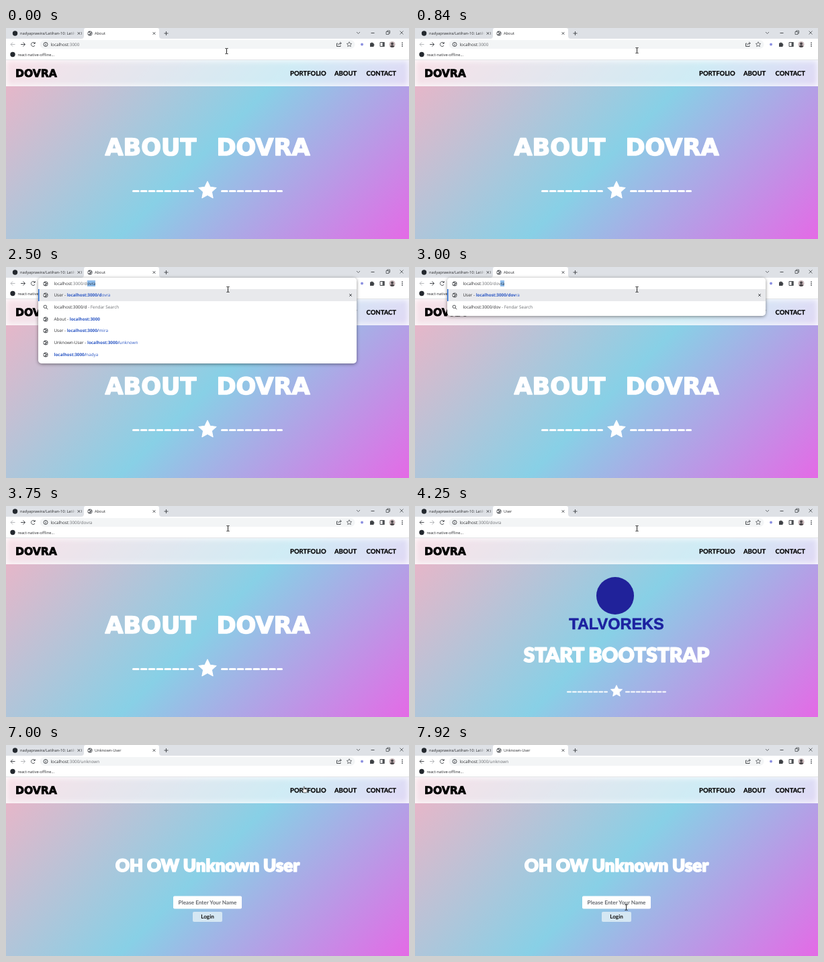
Write an HTML page that moves like this. It is 600 px wide and 315 px high and loops after 8000 ms.

```html
<!DOCTYPE html>
<html lang="en">
<head>
<meta charset="utf-8">
<style>
html, body { margin: 0; width: 600px; height: 315px; overflow: hidden; }
body {
  position: relative; text-rendering: geometricPrecision;
  background: linear-gradient(135deg, #efb4c6, #88d0e6 50%, #e46ae6) 0 48px / 600px 267px no-repeat #fff;
}
body > * { position: absolute; left: 0; top: 0; }
#nav {
  top: 48px; width: 600px; height: 39px;
  background: #fff9; box-shadow: inset 0 0 8px 1px #fffd;
}
text, #drop { font-family: "Open Sans", sans-serif; font-size: 6.35px; fill: #2c2d30; }
.tab { font-size: 5.7px; }
.gray { fill: #6a6d71; color: #6a6d71; }
.wide { font: bold 35px "DejaVu Sans", sans-serif; }
.lato { font-family: Lato, sans-serif; font-weight: 700; fill: #111; }
.link { font-size: 9.5px; fill: #000; stroke: #000; stroke-width: .25; }
.title { fill: #fff; stroke: #fff; stroke-width: 1.6; stroke-linejoin: round; font-weight: 900; text-anchor: middle; }
.mid { text-anchor: middle; }
.line { fill: none; stroke: #4b4e52; stroke-width: 1; }
#drop {
  left: 48px; top: 16px; width: 474px; padding-bottom: 4px; overflow: hidden;
  background: #fff; border-radius: 5px; color: #2c2d30; white-space: pre;
}
#shade { left: 48px; top: 16px; width: 474px; border-radius: 5px; box-shadow: 0 1px 5px #0007; }
#drop div { position: relative; height: 17.75px; line-height: 17.75px; padding-left: 23.5px; }
#drop div.input { height: 17px; line-height: 17px; }
#drop div.hit { background: #e8e9ec; box-shadow: inset 1.5px 0 #2a6fd6; }
#drop svg { position: absolute; left: 7px; top: 5px; }
#drop svg.clear { left: 461px; }
#drop a, #drop b { color: #2b57c4; }
#drop mark { background: #8fbdec; color: #24364a; }
</style>
</head>
<body>
<div id="nav"></div>
<svg width="600" height="315">
  <defs>
    <g id="globe">
      <circle cx="4" cy="4" r="3.5" fill="#505357"/>
      <path d="M1 3.2L3 2.6L4.2 3.8L3.2 5L3.4 6.5L1.6 5ZM4.4 1.2L6.3 2.2L5.2 3.4L4.2 2.5ZM5 4.6L6.8 4.2L6 5.9L5 6.2Z" fill="#fff"/>
    </g>
    <path id="cross" class="line" d="M-1.8 -1.8L1.8 1.8M1.8 -1.8L-1.8 1.8"/>
    <path id="star" d="M0 -1L.3 -.38L.97 -.3L.47 .16L.6 .83L0 .5L-.6 .83L-.47 .16L-.97 -.3L-.3 -.38Z" stroke-linejoin="round"/>
    <path id="back" d="M6.5 0H0M3 -3L0 0L3 3" fill="none"/>
    <linearGradient id="fade"><stop stop-color="#dee1e6" stop-opacity="0"/><stop offset="1" stop-color="#dee1e6"/></linearGradient>
  </defs>
  <rect width="600" height="16" fill="#dee1e6"/>
  <path d="M112 16Q116 16 116 12V3Q116 0 119 0H225Q228 0 228 3V12Q228 16 232 16Z" fill="#fff"/>
  <rect y="16" width="600" height="32" fill="#fff"/>
  <rect y="47" width="600" height="1" fill="#e3e4e7"/>
  <circle cx="13.5" cy="8" r="3.7" fill="#24292f"/>
  <text class="tab" x="21" y="10">nadyaprawira/Latihan-10: Latihan I</text>
  <rect x="95" width="9" height="15" fill="url(#fade)"/>
  <rect x="104" width="8" height="15" fill="#dee1e6"/>
  <use href="#cross" x="108.5" y="8"/>
  <use href="#globe" x="121" y="4"/>
  <use href="#cross" x="220.5" y="8"/>
  <g class="line">
    <path d="M235.5 8H241.5M238.5 5V11M543.5 7.5H548.5"/>
    <path d="M522 6L524.5 8.5L527 6M586.5 4.5L591.5 9.5M591.5 4.5L586.5 9.5M566 5.5H570V9.5H566ZM567.5 5.5V4H571.5V8H570" stroke-width=".8"/>
    <path d="M43 23A3 3 0 1 0 43 26M43.2 21V23.3H41"/>
  </g>
  <g id="arrows"></g>
  <g id="box"></g>
  <circle cx="530" cy="24.5" r="2" fill="#8b8fe0"/>
  <path d="M542 22.5H543.5A1.3 1.3 0 0 1 546 22.5H547.5V24A1.3 1.3 0 0 1 547.5 26.5V28H542Z" fill="#3f4246"/>
  <path class="line" d="M557 21.5H563V27.5H557Z"/><path d="M560.5 21H563.5V28H560.5Z" fill="#4b4e52"/>
  <circle cx="575" cy="24.5" r="4.5" fill="#c9b9bb"/>
  <path d="M571.5 27.4Q575 23.5 578.5 27.4Q575 30.6 571.5 27.4" fill="#4b4649"/><circle cx="575" cy="23.5" r="2" fill="#4b4649"/>
  <path d="M590 21.5V28" stroke="#4b4e52" stroke-width="1.5" stroke-dasharray="1.5 1"/>
  <circle cx="10" cy="39.5" r="3.7" fill="#24292f"/>
  <text class="tab" x="17.5" y="41.5">react-native-offline...</text>
  <text class="wide" x="14" y="73" style="font-size:15.6px;fill:#000;stroke:#000;stroke-width:.8">DOVRA</text>
  <text class="lato link" x="423" y="70.5">PORTFOLIO</text>
  <text class="lato link" x="489" y="70.5">ABOUT</text>
  <text class="lato link" x="536.5" y="70.5">CONTACT</text>
  <g id="page"></g>
</svg>
<div id="shade"></div>
<div id="drop"></div>
<svg width="600" height="315"><g id="cursor"></g></svg>
<script>
const LOOP = 8000, STEP = 1000 / 12, HOST = 'localhost:3000', NAME = 'dovra';
const $ = id => document.getElementById(id);

const divider = (y, from, to, thick, r) => {
  const dash = (to - from + thick) / 8, gap = thick * 1.4;
  const row = x => `<path d="M${x + thick / 2} ${y}h${to - from - thick}" stroke="#fff" stroke-width="${thick}"
    stroke-linecap="round" stroke-dasharray="${dash - gap} ${gap}"/>`;
  return row(from) + row(600 - to) +
    `<use href="#star" transform="translate(300 ${y - 1}) scale(${r})" fill="#fff" stroke="#fff" stroke-width=".08"/>`;
};

const pages = {
  about: {
    title: 'About', path: '',
    body: `<text class="wide title" x="300" y="189.5" style="word-spacing:18px;font-weight:700">ABOUT DOVRA</text>`
      + divider(243.5, 188, 280, 3, 13.5)
  },
  user: {
    title: 'User', path: '/' + NAME,
    body: `<circle cx="298" cy="134" r="28" fill="#20229a"/>
      <text class="mid" x="300" y="184" stroke="#1c22a0" stroke-width=".6"
        style="font:bold 23.5px 'Liberation Sans',sans-serif;fill:#1c22a0">TALVOREKS</text>
      <text class="lato title" x="300" y="233" style="font-size:29.7px;fill:#fff">START BOOTSTRAP</text>`
      + divider(277.5, 226, 287, 2, 9)
  },
  unknown: {
    title: 'Unknown-User', path: '/unknown',
    body: `<text class="lato title" x="300" y="188.5" style="font-size:25.8px;fill:#fff">OH OW Unknown User</text>
      <rect x="249" y="225.5" width="102" height="19" rx="2" fill="#fff"/>
      <text class="lato mid" x="300" y="237.8" style="font-size:8.2px;fill:#666a70">Please Enter Your Name</text>
      <rect x="278" y="249" width="44" height="15" rx="2" fill="#d5e7f3"/>
      <text class="lato mid" x="300" y="259.2" style="font-size:8.2px">Login</text>`
  }
};

const arrows = (back, forward) => `
  <use href="#back" transform="translate(7 24.5)" stroke="${back}"/>
  <use href="#back" transform="translate(28.5 24.5) scale(-1 1)" stroke="${forward}"/>`;

const addressBox = (path, focus) => `
  <rect x="50.5" y="18" width="469" height="13" rx="6.5" fill="${focus ? '#fff' : '#f3f5f6'}"
    stroke="#2a76d8" stroke-width="${focus ? 1.5 : 0}"/>
  <g class="line" stroke-width=".8"><circle cx="59" cy="24.5" r="3"/><path d="M59 24V26.3M59 22.5V23.3"/>
    <path d="M494 23H492.5V27.5H498V26M494.5 25.5Q495 22.5 499 22.8M497.3 21L499.3 22.8L497.3 24.6"/></g>
  <use href="#star" transform="translate(511 24.5) scale(3.8)" fill="none" stroke="#4b4e52" stroke-width=".2"/>
  <text x="66.5" y="26.7">localhost<tspan class="gray">:3000${path}</tspan></text>`;

const icon = (shape, cls = '') => `<svg class="${cls}" width="8" height="8">${shape}</svg>`;
const globe = icon('<use href="#globe"/>');
const lens = icon('<path class="line" d="M5 5L7.2 7.2M5.5 3.3A2.2 2.2 0 1 0 1.1 3.3A2.2 2.2 0 1 0 5.5 3.3"/>');
const clear = icon('<use href="#cross" x="4" y="4"/>', 'clear');

function suggestions(typed) {
  const rest = NAME.slice(typed.length);
  const row = (label, bold, tail = '') => `<div>${globe}${label}<b>${bold}</b><a>${tail}</a></div>`;
  const others = row('About - ', HOST) + row('User - ', HOST + '/', 'mira')
    + row('Unknown-User - ', HOST + '/', 'unknown') + row('', HOST + '/', 'nadya');
  return `<div class="input">${globe}localhost<span class="gray">:3000/${typed}</span>${typed ? `<mark>${rest}</mark>` : ''}</div>
<div class="hit">${globe}User - <b>${HOST}/${typed}</b><a>${rest}</a>${clear}</div>
<div>${lens}${HOST}/${typed}<span class="gray"> - Fendar Search</span></div>${typed.length < 2 ? others : ''}`.replace(/\n/g, '');
}

const pointers = {
  beam: '<path d="M-2 -4H-.5L0 -3.5L.5 -4H2M0 -3.5V3.5M-2 4H-.5L0 3.5L.5 4H2" fill="none" stroke="#222"/>',
  arrow: '<path d="M0 0V8L2 6.3L3.3 9L4.5 8.4L3.3 5.8H5.8Z" fill="#fff" stroke="#222" stroke-width=".6"/>',
  hand: '<path d="M-1.5 -4Q-.7 -5 0 -4V-1L3.5 0Q4 1 3.3 4.5H-1.5L-3.7 1Q-3.5 0 -1.5 1Z" fill="#fff" stroke="#333" stroke-width=".7"/>'
};
const keys = [[0, 328, 34], [170, 330, 33], [4500, 330, 33], [4840, 444, 66], [7170, 444, 66], [7420, 314, 242], [LOOP, 314, 242]];

function cursorAt(t) {
  const i = keys.findIndex(k => k[0] > t), [a, x, y] = keys[i - 1], [b, u, v] = keys[i];
  const p = (t - a) / (b - a), k = p * p * (3 - 2 * p);
  return [x + (u - x) * k, y + (v - y) * k];
}

// Typed characters appear at these times.
const strokes = [2420, 2670, 3000, 3170, 3420];
const shown = {};
function put(id, html) {
  if (shown[id] !== html) $(id).innerHTML = shown[id] = html;
}

function draw(now) {
  const t = Math.floor((now % LOOP + 8) / STEP) * STEP % LOOP + 8;
  const loaded = t >= 3830;
  const page = pages[!loaded ? 'about' : t < 6920 ? 'user' : 'unknown'];
  const path = t >= 3750 && !loaded ? '/' + NAME : page.path;
  put('page', `<text class="tab" x="132" y="10">${page.title}</text>${page.body}`);
  put('arrows', loaded ? arrows('#4b4e52', '#b5b7ba') : arrows('#b5b7ba', '#4b4e52'));
  put('box', addressBox(path, t >= 1670 && t < 3750));

  const open = t >= 2170 && t < 3750;
  $('drop').hidden = $('shade').hidden = !open;
  if (open) {
    put('drop', suggestions(NAME.slice(0, strokes.filter(s => s <= t).length)));
    $('shade').style.height = $('drop').offsetHeight + 'px';
  }

  const [x, y] = cursorAt(t);
  const kind = t < 4580 || t >= 7410 ? 'beam' : t >= 4830 && t < 7250 ? 'hand' : 'arrow';
  put('cursor', pointers[kind]);
  $('cursor').setAttribute('transform', `translate(${x + .5} ${y + .5})`);
}

const start = performance.now();
(function tick() {
  draw(performance.now() - start);
  requestAnimationFrame(tick);
})();
</script>
</body>
</html>
```
